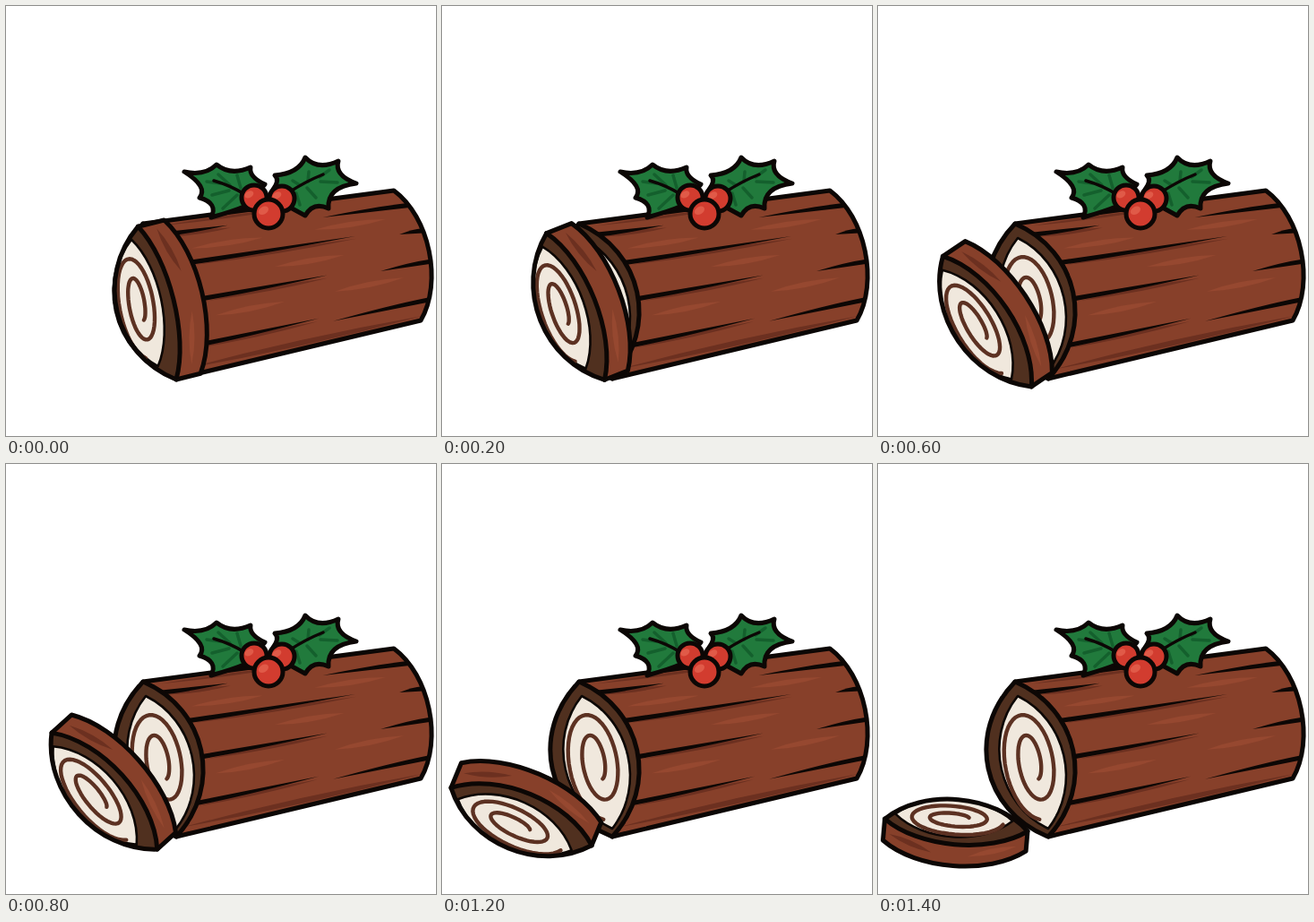
Recreate the animation shown at these times as an HTML page. Size 480x480 px, loop 2200 ms.

```html
<!DOCTYPE html>
<html lang="en">
<head>
<meta charset="utf-8">
<title>Yule log</title>
<style>
  html, body { margin: 0; width: 100%; height: 100%; overflow: hidden; background: #fff; }
  svg { display: block; width: 100vw; height: 100vh; }
  .ink { stroke: #0c0705; stroke-width: 5; stroke-linejoin: round; stroke-linecap: round; }
  .thin { stroke: #0c0705; stroke-width: 2.6; stroke-linejoin: round; }
  .bark { fill: #87402a; }
  .rim { fill: #50301f; }
  .cream { fill: #f0e8dd; }
  .swirl { fill: none; stroke: #5c3122; stroke-width: 4.4; stroke-linecap: round; stroke-linejoin: round; }
  .line { fill: none; }
  .grain { fill: #0c0705; }
  .shine { fill: #964830; }
  .shade { fill: #6c3020; }
  .leaf { fill: #217a3c; }
  .vein { fill: none; stroke: #14602d; stroke-width: 3.5; stroke-linecap: round; }
  .berry { fill: #d23c2f; }
  .glow { fill: #e05a48; }
</style>
</head>
<body>
<svg viewBox="0 0 480 480">
  <g id="log"></g>
  <g id="holly">
    <path class="leaf ink" d="M199 185Q222 190 235 177Q251 190 273 180Q271 191 289 199L268 223Q254 229 229 236Q237 220 216 214Q226 202 199 185Z"/>
    <path class="leaf ink" d="M298 205Q306 194 300 189Q327 187 334 169Q348 184 371 173Q366 189 391 198Q358 202 360 226Q343 218 334 234L312 222Z"/>
    <path class="vein" d="M224 196L239 198M237 188L250 200M258 189L262 203M230 211L249 206M242 226L258 211M320 195L328 200M338 185L337 196M361 183L350 191M370 197L351 196M346 214L336 203M328 222L324 209"/>
    <path class="line ink" style="stroke-width:3.5" d="M232 195Q250 200 268 211M354 188Q334 196 316 208"/>
  </g>
  <g id="slice"></g>
</svg>
<script>
const STEP = 200, LOOP = 2200, LAST = 7;
const $ = id => document.getElementById(id);
const path = (cls, d) => `<path class="${cls}" d="${d}"/>`;
const fix = p => p.map(v => v.toFixed(1)).join(' ');
const mix = (a, b, t) => a.map((v, i) => v + (b[i] - v) * t);

// Point at t along the chord p-q, moved h along its normal.
function side(p, q, t, h) {
  const dx = q[0] - p[0], dy = q[1] - p[1], n = Math.hypot(dx, dy);
  return [p[0] + dx * t - dy / n * h, p[1] + dy * t + dx / n * h];
}
const bow = (p, q, h) => `C${fix(side(p, q, .25, h))} ${fix(side(p, q, .75, h))} ${fix(q)}`;
const onBow = (p, q, h, t) => side(p, q, t, 3 * t * (1 - t) * h);
const lens = (p, q, a, b) => `M${fix(p)}${bow(p, q, a)}${bow(q, p, -b)}Z`;

function swirl(p, q, a, b) {
  const mid = (a + b) * .375, wide = Math.abs(a - b) * .375 * .85;
  const points = Array.from({ length: 91 }, (_, i) => {
    const k = i / 90, turn = .2 + k * 12, s = 1.1 - .75 * k;
    return fix(side(p, q, .5 + .39 * s * Math.cos(turn), mid + wide * s ** 1.4 * Math.sin(turn)));
  });
  return path('swirl', 'M' + points.join('L'));
}

// Cut end between tips A and B, with a cream filling between W and V.
function face(A, B, outer, inner, W, V, creamOut, creamIn) {
  const rim = lens(A, B, outer, inner);
  return path('rim', rim) + path('cream thin', lens(W, V, creamOut, creamIn)) +
    swirl(W, V, creamOut, creamIn) + path('ink line', rim);
}

// Strip pointed at both ends, bulging to one side of the straight line or both.
function blade(cls, p, q, w) {
  return path(cls, `M${fix(p)}Q${fix(side(p, q, .5, w))} ${fix(q)}Q${fix(side(p, q, .5, -w))} ${fix(p)}Z`);
}
// Stroke that is thick at the start and fades to a point.
function taper(p, q, w) {
  return path('grain', `M${fix(side(p, q, 0, w))}Q${fix(side(p, q, .4, w + 1))} ${fix(q)}L${fix(side(p, q, 0, -w))}Z`);
}

function log() {
  const A = [153, 243], B = [190, 416], C = [433, 206], D = [463, 351];
  const near = -63, far = -33;
  const at = (u, v) => mix(onBow(A, B, near, v), onBow(C, D, far, v), u);
  const body = `M${fix(A)}L${fix(C)}${bow(C, D, far)}L${fix(B)}`;
  let out = path('bark', body + 'Z') +
    blade('shade', at(0, .95), at(1, .97), 6) + blade('shade', at(.05, .03), at(.6, .03), 3);

  // height on the log, reach from the left, reach from the right
  const rows = [[.09, .28, .35], [.3, .72, .1], [.54, .55, .22], [.82, .53, .4]];
  rows.forEach(([v, left, right], i) => {
    out += blade('shade', at(.02, v + .02), at(left, v + .02), 4);
    const starts = i % 2 ? [.34] : [.06, .58];
    if (v < .8) for (const u of starts) out += blade('shine', at(u, v + .12), at(u + .3, v + .12), 6);
    out += taper(at(0, v), at(left, v), 2.6) + taper(at(1, v + .04), at(1 - right, v + .04), 2.6);
  });
  return out + path('ink line', body) +
    face(A, B, 66, near, [156, 259], [190, 407], 48, -47);
}

// The slice tips over on its lower tip, then lands with the cut side up.
function slice(step) {
  const k = step / LAST, flat = step === LAST, s = flat ? -1 : 1;
  const arch = p => Math.sin(Math.PI * k ** p);
  const a = (76 - 71 * k + 12.5 * arch(1.4)) * Math.PI / 180;
  const len = 176 - 16 * k ** 6, depth = s * (flat ? 24 : 30);
  const B = [167 + 23 * (1 - k) ** 3, 417 + 20 * arch(2) - 7 * k];
  const A = [B[0] - len * Math.cos(a), B[1] - len * Math.sin(a)];
  const D = side(A, B, 0, -depth), E = side(A, B, 1, -depth * .93);

  const snug = (1 - k) ** 4;
  const outer = s * (flat ? 38 : 51 + 10 * snug);
  const inner = -s * (flat ? 29 : 36 - 11 * snug);
  const back = -s * 30;
  const W = onBow(A, B, outer * .9, .07), V = onBow(A, B, outer * .9, .89);
  const band = t => mix(onBow(D, E, back, t), onBow(A, B, inner, t), .45);

  return path('bark ink', `M${fix(A)}L${fix(D)}${bow(D, E, back)}L${fix(B)}Z`) +
    blade('shade', band(.04), band(.34), 6) + blade('shine', band(.6), band(.93), 6) +
    face(A, B, outer, inner, W, V, outer * .7, inner);
}

const berry = (x, y, r) => `<circle class="berry ink" cx="${x}" cy="${y}" r="${r}"/>` +
  `<ellipse class="glow" cx="${x - 3}" cy="${y - 6}" rx="${r * .38}" ry="${r * .26}" transform="rotate(-30 ${x} ${y})"/>`;

$('log').innerHTML = log();
$('holly').innerHTML += berry(277, 214, 14) + berry(308, 215, 14) + berry(293, 232, 16);

let shown = -1;
function draw() {
  const step = Math.min(LAST, Math.floor(performance.now() % LOOP / STEP));
  if (step !== shown) $('slice').innerHTML = slice(shown = step);
  requestAnimationFrame(draw);
}
draw();
</script>
</body>
</html>
```
